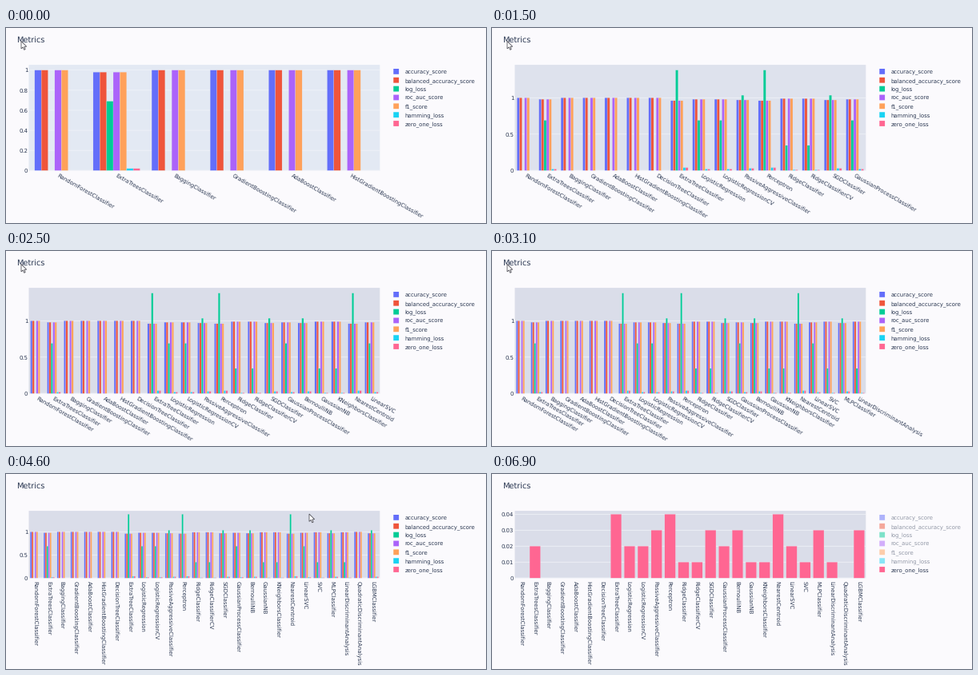
These frames come from a looping animation (600 px wide and 244 px high, 7.6 s). A matplotlib script:

```python
import math

import matplotlib.pyplot as plt
import numpy as np
from matplotlib.animation import FuncAnimation
from matplotlib.collections import PolyCollection
from matplotlib.colors import to_rgb
from matplotlib.patches import Polygon, Rectangle

W, H, DPI = 600, 244, 100
STEP, LOOP = 100, 7600
PT = 72 / DPI
INK, PAGE, GRID = "#2b3852", "#fbfafd", "#f3f5fa"
LEFT, RIGHT, TOP = 28.5, 467.3, 46.1
FONT = 6.88
ROW_Y, ROW_GAP = 54.4, 10.85

GROWN = 3900                    # all models are in the chart
ENTER, CLICK, EVERY = 4600, 5000, 340
CURSOR_HOME, CURSOR_BACK = (19, 16.5), (379, 50)
LEGEND_X, CURSOR_EXIT = 505, (398, 0)

METRICS = {
    "accuracy_score": "#636efa",
    "balanced_accuracy_score": "#ef553b",
    "log_loss": "#00cc96",
    "roc_auc_score": "#ab63fa",
    "f1_score": "#ffa15a",
    "hamming_loss": "#19d3f3",
    "zero_one_loss": "#ff6692",
}
NAMES = list(METRICS)

MODELS = """
    RandomForestClassifier ExtraTreesClassifier BaggingClassifier
    GradientBoostingClassifier AdaBoostClassifier
    HistGradientBoostingClassifier DecisionTreeClassifier ExtraTreeClassifier
    LogisticRegression LogisticRegressionCV PassiveAggressiveClassifier
    Perceptron RidgeClassifier RidgeClassifierCV SGDClassifier
    GaussianProcessClassifier BernoulliNB GaussianNB KNeighborsClassifier
    NearestCentroid LinearSVC SVC MLPClassifier LinearDiscriminantAnalysis
    QuadraticDiscriminantAnalysis LGBMClassifier
""".split()

# Misclassified samples out of 100; models not listed make no mistake
MISTAKES = {
    1: """RidgeClassifier RidgeClassifierCV GaussianNB KNeighborsClassifier
          SVC LinearDiscriminantAnalysis""",
    2: """ExtraTreesClassifier LogisticRegression LogisticRegressionCV
          GaussianProcessClassifier LinearSVC""",
    3: """PassiveAggressiveClassifier SGDClassifier BernoulliNB
          MLPClassifier LGBMClassifier""",
    4: "ExtraTreeClassifier Perceptron NearestCentroid",
}
ERROR = {name: n / 100 for n, group in MISTAKES.items()
         for name in group.split()}

plt.rcParams.update({"text.hinting": "none", "path.snap": False,
                     "font.family": "DejaVu Sans"})
fig = plt.figure(figsize=(W / DPI, H / DPI), dpi=DPI, facecolor=PAGE)
ax = fig.add_axes([0, 0, 1, 1])


def score(model, metric):
    error = ERROR.get(model, 0)
    if metric == "log_loss":
        return 34.5 * error
    return error if metric.endswith("loss") else 1 - error


def mix(a, b, u):
    """Blend two points or colours, with u held between 0 and 1."""
    u = min(max(u, 0), 1)
    return np.array(a) * (1 - u) + np.array(b) * u


def text(x, y, label, size=FONT, **style):
    style = {"va": "center_baseline", "color": INK, **style}
    ax.text(x, y, label, fontsize=size * PT, **style)


def box(x, y, width, height, color, **style):
    ax.add_patch(Rectangle((x, y), width, height, fc=color, lw=0, **style))


def tick_step(top_value, height):
    """Smallest round step that leaves enough room between labels."""
    rough = top_value / (min(max(height / 23, 4), 9) + 1)
    base = 10 ** math.floor(math.log10(rough))
    return base * next(m for m in (1, 2, 5, 10) if m * base >= rough)


def draw_axis(bottom, scale, top_value):
    step = tick_step(top_value, bottom - TOP)
    for k in range(int(top_value / step + 1e-9) + 1):
        y = bottom - k * step * scale
        ax.plot([LEFT, RIGHT], [y, y], color=GRID, zorder=1,
                lw=(0.7 if k else 1.1) * PT)
        text(27.2, y, f"{k * step:g}", ha="right")


def draw_plot(t, models, metrics):
    steep = len(models) == len(MODELS)
    bottom = 130.2 if steep else 178.3
    top_value = max(score(m, k) for m in models for k in metrics) / 0.95
    scale = (bottom - TOP) / top_value
    shade = mix(to_rgb("#e3e9f3"), to_rgb("#dadde9"), t / 2500)
    box(LEFT, TOP, RIGHT - LEFT, bottom - TOP, shade)
    draw_axis(bottom, scale, top_value)

    slot = (RIGHT - LEFT) / len(models)
    width = 0.8 * slot / len(metrics)
    dx, dy, angle = (-2.8, 4, -90) if steep else (-2, 7.7, -30)
    bars, fills = [], []
    for i, model in enumerate(models):
        for j, metric in enumerate(metrics):
            x = LEFT + (i + 0.1) * slot + j * width
            y = bottom - score(model, metric) * scale
            if y < bottom:
                bars.append([(x, bottom), (x, y),
                             (x + width, y), (x + width, bottom)])
                fills.append(METRICS[metric])
        text(LEFT + (i + 0.5) * slot + dx, bottom + dy, model, ha="left",
             va="baseline", rotation=angle, rotation_mode="anchor")
    ax.add_collection(PolyCollection(bars, facecolors=fills, zorder=2,
                                     edgecolors="#e5ecf6", linewidths=0.2 * PT))


def draw_legend(hidden):
    for i, name in enumerate(NAMES):
        y = ROW_Y + ROW_GAP * i
        alpha = 0.5 if i < hidden else 1
        box(484.3, y - 3.4, 6.8, 6.8, METRICS[name], alpha=alpha)
        text(498.8, y, name, alpha=alpha)


def cursor_tip(t):
    last_click = CLICK + 5 * EVERY
    if t < GROWN + STEP:
        return CURSOR_HOME
    if ENTER <= t <= last_click:
        row = max(t - CLICK, 0) / EVERY
        target = (LEGEND_X, ROW_Y + ROW_GAP * row)
        return mix(CURSOR_BACK, target, (t - ENTER) / (CLICK - ENTER))
    if last_click < t < last_click + 2 * STEP:
        start = (LEGEND_X, ROW_Y + ROW_GAP * 5)
        return mix(start, CURSOR_EXIT, (t - last_click) / (2 * STEP))
    return None


def draw_cursor(tip):
    arrow = np.array([(0, 0), (0, 9.4), (2.2, 7.4), (3.7, 10.8), (5.2, 10.1),
                      (3.8, 6.9), (6.7, 6.7)])
    ax.add_patch(Polygon(arrow + tip, fc="white", ec="#4a4a52",
                         lw=0.8 * PT, zorder=5))


def draw(frame):
    t = frame * STEP
    ax.clear()
    ax.set(xlim=(0, W), ylim=(H, 0))
    ax.axis("off")

    # Models arrive ever more slowly; later the metrics are switched off
    growth = 1 - max(1 - t / GROWN, 0) ** 1.5
    count = 6 + int((len(MODELS) - 6) * growth)
    hidden = min(max((t - CLICK) // EVERY + 1, 0), len(NAMES) - 1)

    text(12.6, 13.7, "Metrics", 9.75)
    draw_plot(t, MODELS[:count], NAMES[hidden:])
    draw_legend(hidden)
    tip = cursor_tip(t)
    if tip is not None:
        draw_cursor(tip)
    return []


anim = FuncAnimation(fig, draw, frames=LOOP // STEP, interval=STEP,
                     init_func=lambda: [], repeat=True, repeat_delay=0)
plt.show()
```
